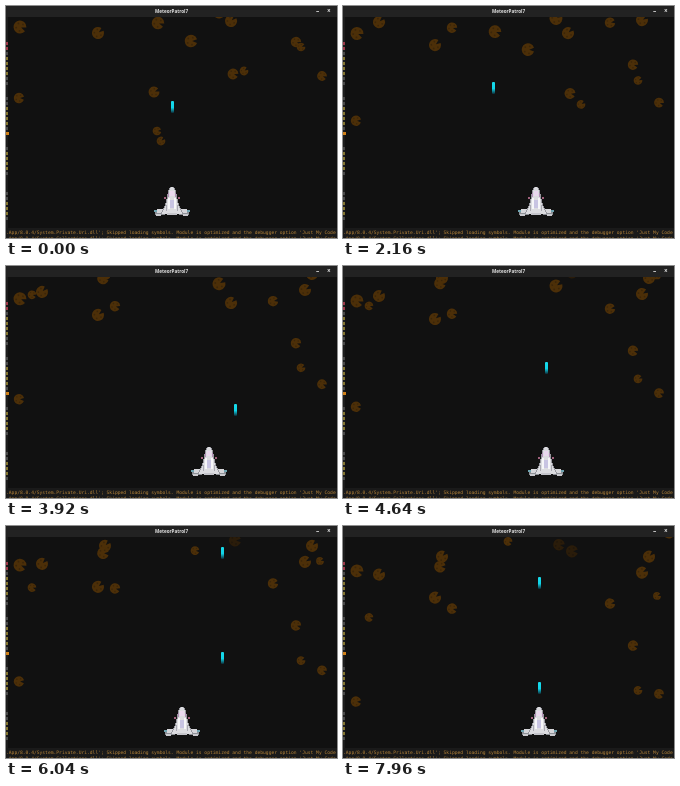
Animation, 331 px wide and 232 px high, one loop 8 s. Source, as an HTML page with a canvas:

```html
<!DOCTYPE html>
<html lang="en">
<head>
<meta charset="utf-8">
<style>
  html, body { margin: 0; width: 100%; height: 100%; overflow: hidden; background: #111; }
  canvas { position: absolute; left: 0; top: 0; }
  .bar { position: absolute; left: 0; top: 0; width: 331px; height: 11px; background: #222;
         color: #e4e4e4; font: bold 4.6px/10px "Open Sans", sans-serif; text-align: center; }
  .bar span { position: absolute; top: 0; font-size: 6.5px; }
  .log { position: absolute; left: 0; top: 222px; width: 331px; height: 10px; overflow: hidden;
         box-sizing: border-box; padding-top: 1.5px; background: #1a1a1a; color: #b58338;
         white-space: pre; font: 4.65px/6.2px "DejaVu Sans Mono", monospace; }
</style>
</head>
<body>
<canvas id="stage" width="331" height="232"></canvas>
<div class="bar">MeteorPatrol7<span style="left:310px">–</span><span style="left:321px">×</span></div>
<div class="log">.App/8.0.4/System.Private.Uri.dll'; Skipped loading symbols. Module is optimized and the debugger option 'Just My Code
.App/8.0.4/System.Collections.dll'; Skipped loading symbols. Module is optimized and the debugger option 'Just My Code</div>
<script>
const LOOP = 8, STEP = 0.04, TOP = 11;
const SHIP_SPEED = 165, SHOT_SPEED = 204, MUZZLE_Y = 182, FIRST_SHOT = -0.395, RELOAD = 0.516;
const HIT_MARGIN = 5;
const ctx = document.getElementById('stage').getContext('2d');

// Small asteroids fall faster; each point is [x, y at time 0].
const field = (speed, points, far = false) =>
  points.map(([x, y]) => ({ x, y, speed, far, r: 7 - 0.17 * speed, end: Infinity }));

const asteroids = [
  field(3, [[14, 21], [213, 6]]),
  field(4, [[152, 17], [185, 35]]),
  field(5.6, [[92, 27], [225, 15], [36, 4], [299, 2], [99, -14], [306, -14]]),
  field(7, [[97, -15], [326, -49]]),
  field(9, [[148, 86], [227, 68]]),
  field(10.5, [[290, 36], [13, 92], [109, -1], [267, -6]]),
  field(12.3, [[316, 70]]),
  field(15.5, [[295, 41], [238, 65], [151, 125], [155, 135], [26, -32], [189, -69], [165, -108]]),
  field(18.2, [[314, -75]]),
  field(5.7, [[229, -20]], true),
  field(7, [[216, -37]], true),
].flat();

// [start time, destination x]
const moves = [[0, 150], [1.67, 193], [2.2, 229], [3.76, 203], [4.66, 216], [5.8, 170],
  [6.18, 188], [7.1, 196]];

function shipX(t) {
  let x = 166;
  for (const [start, goal] of moves) {
    const reach = Math.max(0, t - start) * SHIP_SPEED;
    x += Math.sign(goal - x) * Math.min(reach, Math.abs(goal - x));
  }
  return Math.round(x);
}

// Each shot ends at the first asteroid it meets.
const shots = [];
for (let fired = FIRST_SHOT; fired < LOOP; fired += RELOAD) {
  const shot = { fired, x: shipX(fired), end: Infinity };
  let victim = null;
  for (const a of asteroids) {
    const meet = (MUZZLE_Y + SHOT_SPEED * fired - a.y - a.r) / (SHOT_SPEED + a.speed);
    const onStage = a.y + a.speed * meet > TOP;
    const inLine = Math.abs(a.x - shot.x) < a.r + HIT_MARGIN;
    if (a.far || !inLine || !onStage || meet < 0 || meet > a.end || meet > shot.end) continue;
    victim = a;
    shot.end = meet;
  }
  if (victim) victim.end = shot.end;
  shots.push(shot);
}

function rect(color, x, y, w, h) {
  ctx.fillStyle = color;
  ctx.fillRect(x, y, w, h);
}

function mirrored(color, cx, dx, y, w, h) {
  rect(color, cx + dx, y, w, h);
  rect(color, cx - dx - w, y, w, h);
}

function drawAsteroid({ x, y, speed, r, far }, t) {
  ctx.save();
  ctx.translate(x, y + speed * t);
  ctx.rotate(Math.sin(x) * 0.6 - 0.2);
  ctx.fillStyle = far ? '#2a1c0a' : '#4c2f08';
  ctx.beginPath();
  ctx.moveTo(r * 0.2, 0);
  ctx.arc(0, 0, r, 0.3, Math.PI * 2 - 0.3);
  ctx.fill();
  ctx.fillStyle = far ? '#20170c' : '#3a250a';
  for (let i = 1; i <= 4; i++) {
    ctx.beginPath();
    ctx.arc(Math.cos(i * 1.3) * r * 0.6, Math.sin(i * 1.3) * r * 0.6, r * 0.14, 0, 7);
    ctx.fill();
  }
  ctx.restore();
}

function drawShot({ fired, x, end }, t) {
  const y = Math.round(MUZZLE_Y - (t - fired) * SHOT_SPEED);
  if (t >= end || y > 186 || y < 0) return;
  const glow = ctx.createLinearGradient(0, y - 6, 0, y + 6);
  glow.addColorStop(0, '#18dcec');
  glow.addColorStop(0.55, '#10d4e8');
  glow.addColorStop(1, '#0c2c38');
  ctx.fillStyle = glow;
  ctx.beginPath();
  ctx.roundRect(x - 1, y - 6, 3, 12, 1);
  ctx.fill();
}

function drawShip(x) {
  mirrored('#8d9096', x, 7, 204, 10, 5);
  mirrored('#d6d6da', x, 7, 203, 8, 4);
  mirrored('#6fa3b0', x, 15, 204, 3, 2);
  mirrored('#c9c9ce', x, 11, 208, 5, 2);
  for (let i = 0; i < 27; i++) {
    const half = Math.round(2 + Math.min(2, i / 2) + 6 * (i / 24) ** 2);
    rect('#98989f', x - half, 181 + i, half * 2, 1);
    rect('#dcdce0', x - half + 1, 181 + i, half * 2 - 2, 1);
  }
  rect('#ead8ee', x - 2, 185, 4, 5);
  mirrored('#b48db8', x, 3, 187, 1, 4);
  mirrored('#a0607c', x, 6, 191, 2, 2);
  mirrored('#f6f6f8', x, 2, 192, 2, 11);
  rect('#c8c4e2', x - 2, 194, 4, 8);
  mirrored('#a9a9b2', x, 5, 199, 1, 6);
  rect('#c4c4ca', x - 5, 207, 10, 2);
}

// Slivers of the editor behind the game window.
function drawEdges() {
  rect('#1c1c1c', 0, TOP, 2, 211);
  for (let i = 0; i < 36; i++) {
    const y = 36 + i * 5, pick = Math.abs(Math.sin(i * 12.9));
    const color = i < 2 ? '#a03a4a' : i === 18 ? '#d08018' : pick > 0.8 ? '#857630' : '#4a4a4a';
    if (i < 2 || i === 18 || pick > 0.45) rect(color, 0, y, i === 18 ? 3 : 2, 3);
  }
}

function draw(elapsed) {
  const t = Math.floor((elapsed / 1000 % LOOP) / STEP + 1e-6) * STEP;
  rect('#111', 0, 0, 331, 232);
  drawEdges();
  for (const a of asteroids) if (t < a.end) drawAsteroid(a, t);
  for (const s of shots) drawShot(s, t);
  drawShip(shipX(t));
}

const start = performance.now();
function tick() {
  draw(performance.now() - start);
  requestAnimationFrame(tick);
}
tick();
</script>
</body>
</html>
```
